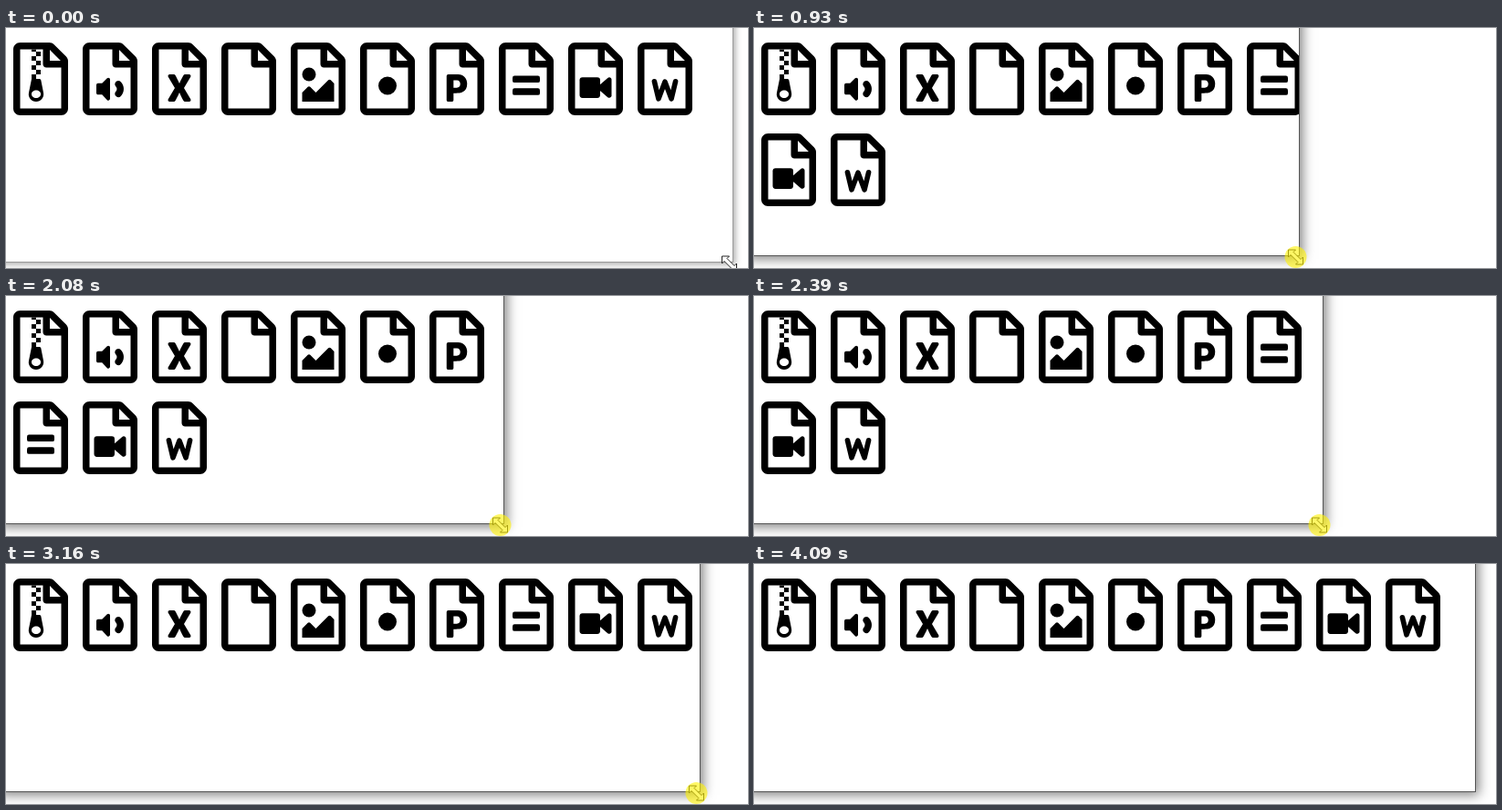
An HTML page for the animation above (4170 ms loop, 813 by 264 pixels).

```html
<!DOCTYPE html>
<html>
<head>
<meta charset="utf-8">
<title>File icons in a resizing window</title>
<style>
html, body { margin: 0; width: 100%; height: 100%; overflow: hidden; background: #fff; }
#win {
  position: absolute; left: -10px; top: -20px; box-sizing: border-box; overflow: hidden;
  background: #fff; border: 1px solid #555; box-shadow: 3px 3px 12px rgba(0, 0, 0, .5);
}
#win.idle { border-color: #999; box-shadow: 2px 2px 7px rgba(0, 0, 0, .35); }
#icons { position: absolute; left: 9px; top: 19px; }
#icons path { fill-rule: evenodd; }
#pointer { position: absolute; left: 0; top: 0; overflow: hidden; }
</style>
</head>
<body>
<div id="win"><svg id="icons" width="813" height="264"></svg></div>
<svg id="pointer" width="813" height="264">
  <g id="cursor">
    <path d="M-8-8h8l-2.5 2.5 8 8L8 0v8H0l2.5-2.5-8-8L-8 0z" fill="#fff" stroke="#222"/>
    <circle id="glow" r="12" fill="#fff200" fill-opacity=".6"/>
  </g>
</svg>
<script>
const $ = id => document.getElementById(id);
const path = d => `<path d="${d}"/>`;
const bar = y => `<rect x="96" y="${y}" width="192" height="48" rx="14"/>`;

// All icons use a 384 x 512 grid
const page = 'M369.9 97.9L286 14C277 5 264.8 0 252.1 0H48C21.5 0 0 21.5 0 48v416c0 26.5 21.5 48 48 48h288c26.5 0 48-21.5 48-48V131.9c0-12.7-5.1-25-14.1-34zM332.1 128H256V51.9zM48 464V48h160v104c0 13.3 10.7 24 24 24h104v288z';
const glyphs = [
  // archive
  path('M128 48h32v16h-32zM160 64h32v32h-32zM128 96h32v32h-32zM160 128h32v32h-32zM128 160h32v32h-32zM160 192h32v32h-32z') +
  path('M194.2 265.7c-1.1-5.6-6-9.7-11.8-9.7h-22.1v-32h-32v32l-19.7 97.1C102 385.6 126.8 416 160 416c33.1 0 57.9-30.2 51.5-62.6zm-33.9 124.4c-17.9 0-32.4-12.1-32.4-27s14.5-27 32.4-27 32.4 12.1 32.4 27-14.5 27-32.4 27z'),
  // audio
  path('M192 260c0-10.7-12.9-16-20.5-8.5L136 287h-28c-6.6 0-12 5.4-12 12v56c0 6.6 5.4 12 12 12h28l35.5 37c7.6 7.5 20.5 2.2 20.5-8.5zM233.2 344c9-9.3 9-24.1 0-33.4-22.1-22.8 12.2-56.3 34.4-33.5 27.2 27.9 27.2 72.4 0 100.4-21.8 22.4-57-10.3-34.4-33.5z'),
  // letter X
  path('M260 224h-28.8c-4.4 0-8.4 2.4-10.5 6.3-18 33.1-22.2 42.4-28.6 57.7-13.9-29.1-6.9-17.3-28.6-57.7-2.1-3.9-6.2-6.3-10.6-6.3H124c-9.3 0-15 10-10.4 18l46.3 78-46.3 78c-4.7 8 1.1 18 10.4 18h28.9c4.4 0 8.4-2.4 10.5-6.3 21.7-40 23-45 28.6-57.7 14.9 30.2 5.9 15.9 28.6 57.7 2.1 3.9 6.2 6.3 10.6 6.3H260c9.3 0 15-10 10.4-18L224 320l46.3-78c4.7-8-1.1-18-10.3-18z'),
  // blank
  '',
  // image
  path('M80 416h224V288l-23.5-23.5c-4.7-4.7-12.3-4.7-17 0L176 352l-39.5-39.5c-4.7-4.7-12.3-4.7-17 0L80 352z') +
  '<circle cx="128" cy="224" r="48"/>',
  // plain dot
  '<circle cx="192" cy="304" r="64"/>',
  // letter P
  path('M120 236c0-6.6 5.4-12 12-12h69.2c37 0 62.8 27 62.8 66.3 0 74.3-68.7 66.5-95.5 66.5V404c0 6.6-5.4 12-12 12H132c-6.6 0-12-5.4-12-12zM168.5 317.9h23c7.9 0 13.9-2.4 18.1-7.2 8.5-9.8 8.4-28.5.1-37.8-4.1-4.6-9.9-7-17.4-7h-23.8z'),
  // text lines
  bar(234) + bar(322),
  // video
  '<rect x="80" y="244" width="144" height="146" rx="20"/>' +
  path('M218 300l59-51c11-8 27-2 27 12v112c0 14-16 20-27 12l-59-51z'),
  // letter W
  '<path d="M118 274l29 122 45-120 45 120 29-122" fill="none" stroke="#000" stroke-width="36" stroke-linecap="round" stroke-linejoin="round"/>'
];
$('icons').innerHTML = glyphs.map(g => `<g>${path(page)}${g}</g>`).join('');
const icons = [...$('icons').children];

// Drag strokes: first time, last time, edge position at each even step
const steps = [{ t: 0, x: 796 }];
for (const [from, to, ...xs] of [
  [240, 700, 793, 779, 757, 739, 725, 705, 676],
  [780, 1240, 650, 624, 597, 576, 553, 528, 500],
  [1310, 1620, 493, 482, 460, 441, 429],
  [1850, 2320, 440, 472, 508, 545, 564, 584, 604],
  [2390, 2850, 623, 645, 660, 675, 688, 706, 724],
  [2930, 3400, 738, 748, 754, 760, 766, 771, 776],
  [3480, 3480, 790]
]) xs.forEach((x, i) => steps.push({
  t: from + Math.floor(i * (to - from) / Math.max(1, xs.length - 1) / 10) * 10, x
}));

const minEdge = 500, loop = 4170;

function draw(t) {
  const n = steps.findLastIndex(s => s.t <= t);
  const x = steps[n].x, edge = Math.max(minEdge, x);
  const bottom = t < 240 ? 257 : 250;
  $('win').className = t < 70 ? 'idle' : '';
  $('win').style.width = edge + 11 + 'px';
  $('win').style.height = bottom + 21 + 'px';

  // Reflow trails the edge by one step while shrinking
  const cols = Math.floor(Math.max(edge, steps[Math.max(0, n - 1)].x) / 76);
  icons.forEach((icon, i) => icon.setAttribute('transform',
    `translate(${8 + i % cols * 76} ${16 + Math.floor(i / cols) * 100}) scale(.15625)`));

  $('cursor').setAttribute('transform', `translate(${x - 3.5} ${bottom + 2})`);
  $('cursor').setAttribute('opacity', t < 3940 ? 1 : t < 4010 ? .66 : t < 4090 ? .33 : 0);
  $('glow').setAttribute('opacity', t < 70 ? 0 : 1);
}

const start = performance.now();
function tick() {
  draw((performance.now() - start) % loop);
  requestAnimationFrame(tick);
}
tick();
</script>
</body>
</html>
```
